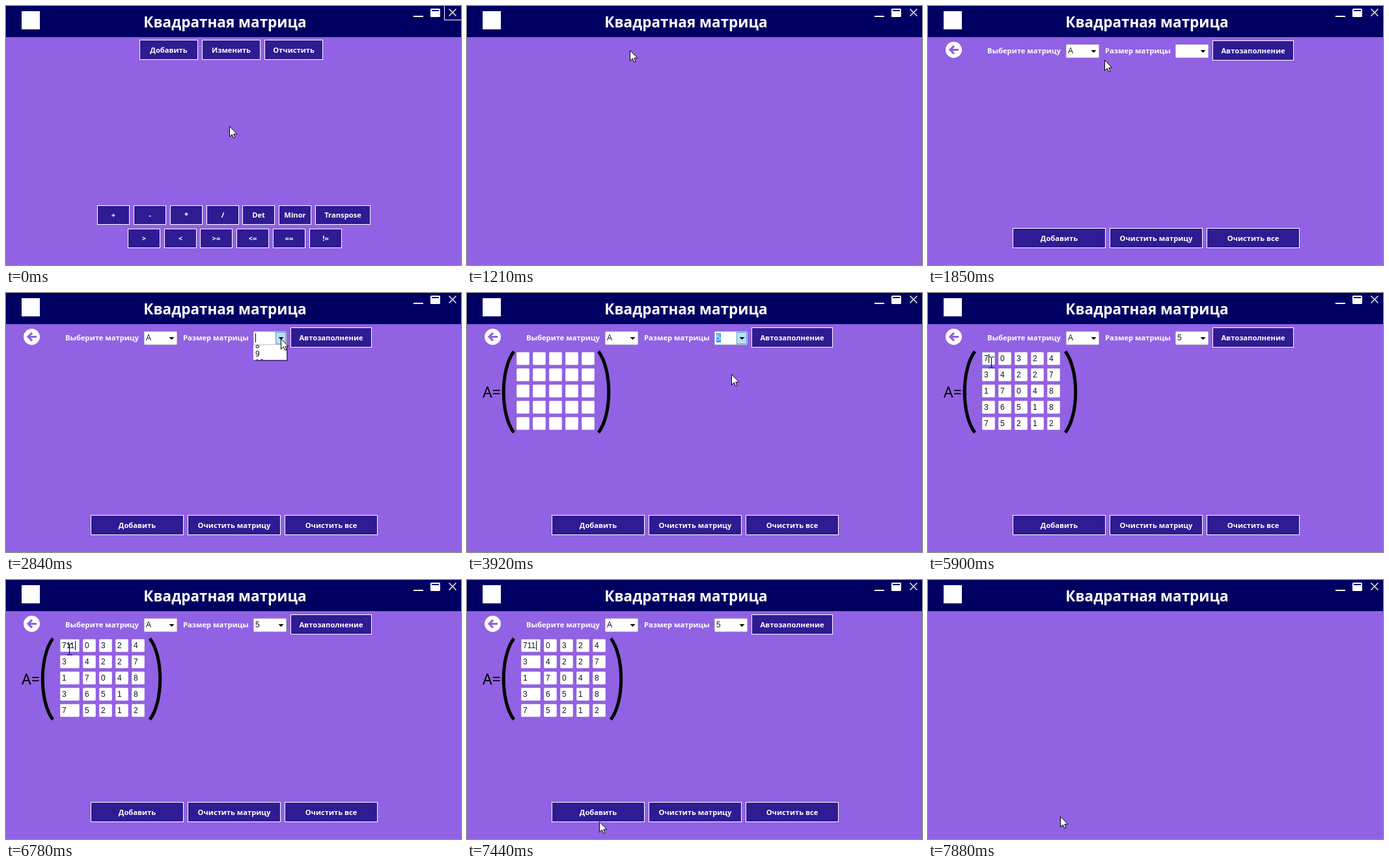
An HTML page for the animation above (7990 ms loop, 699 by 399 pixels).

```html
<!DOCTYPE html>
<html lang="ru">
<head>
<meta charset="utf-8">
<title>Квадратная матрица</title>
<style>
html, body { margin: 0; width: 100%; height: 100%; overflow: hidden; background: #9162e3; }
svg { display: block; width: 100%; height: 100%; }
text { font: 700 11.2px "Noto Sans", sans-serif; fill: #fff; }
.mid { text-anchor: middle; }
.title { font-size: 22.5px; }
.big { font-size: 23px; font-weight: 400; fill: #000; }
.field { font: 12px "Liberation Sans", Arial, sans-serif; fill: #101028; }
.inverse { fill: #fff; }
</style>
</head>
<body>
<svg id="stage" viewBox="0 0 699 399"></svg>
<script>
const LOOP = 7990, STEP = 110;
const stage = document.getElementById('stage');

// Screen updates come in bursts: [start, number of updates]
const bursts = [[0, 1], [550, 4], [1210, 2], [1850, 8], [2730, 8], [3610, 1], [3710, 1],
  [3920, 6], [4800, 8], [5680, 5], [6340, 2], [6780, 8], [7660, 3]];
const ticks = bursts.flatMap(([start, n]) => Array.from({ length: n }, (_, i) => start + i * STEP));

// Pointer path: [time, x, y]
const path = [[0, 343, 185], [440, 343, 185], [880, 250, 68], [1740, 250, 68], [1850, 271, 83],
  [2620, 422, 70], [2950, 422, 70], [3500, 404, 124], [3710, 404, 124], [3920, 406, 125],
  [4470, 478, 72], [4800, 478, 72], [5130, 335, 93], [5570, 97, 107], [6780, 97, 107],
  [7330, 203, 380], [7550, 203, 364], [LOOP, 203, 364]];

const values = ['70324', '34227', '17048', '36518', '75212'];

function pointer(t) {
  const i = path.findIndex(p => p[0] > t);
  const [t0, x0, y0] = path[i - 1], [t1, x1, y1] = path[i];
  const k = (t - t0) / (t1 - t0);
  return [Math.round(x0 + (x1 - x0) * k), Math.round(y0 + (y1 - y0) * k)];
}

const rect = (x, y, w, h, fill, more = '') =>
  `<rect x="${x}" y="${y}" width="${w}" height="${h}" fill="${fill}" ${more}/>`;
const text = (x, y, s, cls = '') => `<text x="${x}" y="${y}" class="${cls}">${s}</text>`;
const line = (d, color, width, more = '') =>
  `<path d="${d}" fill="none" stroke="${color}" stroke-width="${width}" ${more}/>`;
const outline = (x, y, w, h, fill, color, b = 1, r = 0) =>
  rect(x + b / 2, y + b / 2, w - b, h - b, fill, `rx="${r}" stroke="${color}" stroke-width="${b}"`);

function button(x, y, w, h, label, border = 1) {
  label = label.replace('<', '&lt;').replace('>', '&gt;');
  return outline(x, y, w, h, '#2f1b92', '#fff', border) + text(x + w / 2, y + h / 2 + 4, label, 'mid');
}

function titleBar(closeHot) {
  return rect(0, 0, 699, 48, '#000062') + rect(24, 8, 28, 28, '#fff') +
    text(336.5, 33, 'Квадратная матрица', 'mid title') +
    rect(626, 15, 15, 2, '#fff') +
    rect(652, 4, 15, 13, '#fff', 'rx="1.5"') + rect(654, 6, 11, 2, '#000062') +
    line('M680.5 4.5L691.5 15.5M691.5 4.5L680.5 15.5', '#fff', 1.4) +
    (closeHot ? outline(673, -1, 27, 23, 'none', '#fff') : '');
}

function mainPage() {
  const row = (xs, y, h, labels) =>
    labels.map((s, i) => button(xs[i], y, s === 'Transpose' ? 85 : 50, h, s)).join('');
  return ['Добавить', 'Изменить', 'Отчистить'].map((s, i) => button(205 + 96 * i, 52, 90, 31, s)).join('') +
    row([140, 196, 252, 308, 363, 419, 475], 307, 30, ['+', '-', '*', '/', 'Det', 'Minor', 'Transpose']) +
    row([187, 243, 298, 354, 410, 466], 343, 30, ['>', '<', '>=', '<=', '==', '!=']);
}

function combo(x, value, hot, selected) {
  return outline(x, 59, 51, 21, '#fff', '#c9c7d6', 1, 1) +
    (hot ? outline(x + 34, 60, 16, 19, '#b5e0f8', '#5a9cc8') : '') +
    `<path d="M${x + 38.5} 68h8l-4 4z"/>` +
    (selected ? rect(x + 3, 62, 7, 14, '#3399ff') : '') +
    text(x + 3, 73, value, selected ? 'field inverse' : 'field');
}

function dropList(height, pointerY) {
  const full = 106, top = 80, shift = full - height;
  const hover = Math.floor((pointerY - top - 1) / 13);
  let rows = '';
  for (let i = 0; i < 9; i++) {
    const y = top + i * 13 - shift, on = i === hover;
    if (on) rows += rect(381, y, 48, 13, '#3399ff');
    rows += text(383, y + 10, i + 2, on ? 'field inverse' : 'field');
  }
  return rect(383, top, 50, height + 2, '#2b1c50', 'opacity=".55"') +
    rect(380, top, 51, height, '#fff') +
    `<clipPath id="list"><rect x="380" y="${top}" width="51" height="${height}"/></clipPath>` +
    `<g clip-path="url(#list)">${rows}</g>` +
    (height === full ? outline(380, top, 51, height, 'none', '#333') : '');
}

function matrix(t) {
  const filled = t >= 4800;
  const first = t >= 6450 ? '711' : t >= 6340 ? '71' : '7';
  const grow = first.length > 2 ? 10 : 0;
  const left = filled ? 83 : 76;
  let out = text(24, 161, 'A=', 'big') +
    line('M72 90C51 118 51 187 72 215', '#000', 5);
  for (let r = 0; r < 5; r++) for (let c = 0; c < 5; c++) {
    const x = left + 25 * c + (c ? grow : 0), y = 91 + 25 * r;
    const active = t >= 5680 && !r && !c;
    out += outline(x, y, c ? 20 : 20 + grow, 20, '#fff', active ? '#b5cfe7' : '#e4def2', 1, 1);
    if (filled) out += text(x + 3, y + 14, r || c ? values[r][c] : first, 'field');
    if (active) out += rect(x + 3 + Math.round(first.length * 6.5), y + 3, 1, 14, '#000');
  }
  const right = 202 + (filled ? 9 : 0) + grow;
  return out + line(`M${right} 90c21 28 21 97 0 125`, '#000', 5);
}

function editPage(t, pointerY) {
  const listHeight = t < 2840 || t >= 3610 ? 0 : t < 2950 ? 23 : 106;
  return '<circle cx="39.5" cy="67.5" r="12.5" fill="#fff"/>' +
    line('M47 67.5H34M40 61.5L34 67.5L40 73.5', '#9162e3', 3.2) +
    text(91, 73, 'Выберите матрицу') + combo(212, 'A') +
    text(272, 73, 'Размер матрицы') +
    combo(380, t >= 3610 ? '5' : '', t >= 2620 && t < 4030, t >= 3610 && t < 4800) +
    (t >= 2730 && t < 3610 ? rect(383, 62, 1, 14, '#000') : '') +
    button(437, 53, 125, 31, 'Автозаполнение', t >= 4800 && t < 5680 ? 2 : 1) +
    ['Добавить', 'Очистить матрицу', 'Очистить все'].map((s, i) => button(130 + 149 * i, 342, 143, 31, s)).join('') +
    (t >= 3710 ? matrix(t) : '') +
    (listHeight ? dropList(listHeight, pointerY) : '');
}

function cursor(x, y, beam) {
  const d = beam ? 'M-3.5-8.5H-1L.5-7.5L2-8.5H4.5M.5-7.5V7.5M-3.5 8.5H-1L.5 7.5L2 8.5H4.5'
    : 'M.5.5V16.5L4.3 13L6.7 18.5L9 17.5L6.7 12.2H11.8Z';
  return `<path transform="translate(${x} ${y})" d="${d}" fill="${beam ? 'none' : '#fff'}" stroke="#000"/>`;
}

function scene(t) {
  const [x, y] = pointer(t);
  const page = t < 1210 ? mainPage() : t >= 1320 && t < 7880 ? editPage(t, y) : '';
  return rect(0, 0, 699, 399, '#9162e3') + titleBar(t < 1210) + page +
    cursor(x, y, t >= 5570 && t <= 6780);
}

let shown = -1;
function frame() {
  const now = performance.now() % LOOP;
  const t = ticks.findLast(tick => tick <= now);
  if (t !== shown) stage.innerHTML = scene(shown = t);
  requestAnimationFrame(frame);
}
frame();
</script>
</body>
</html>
```
